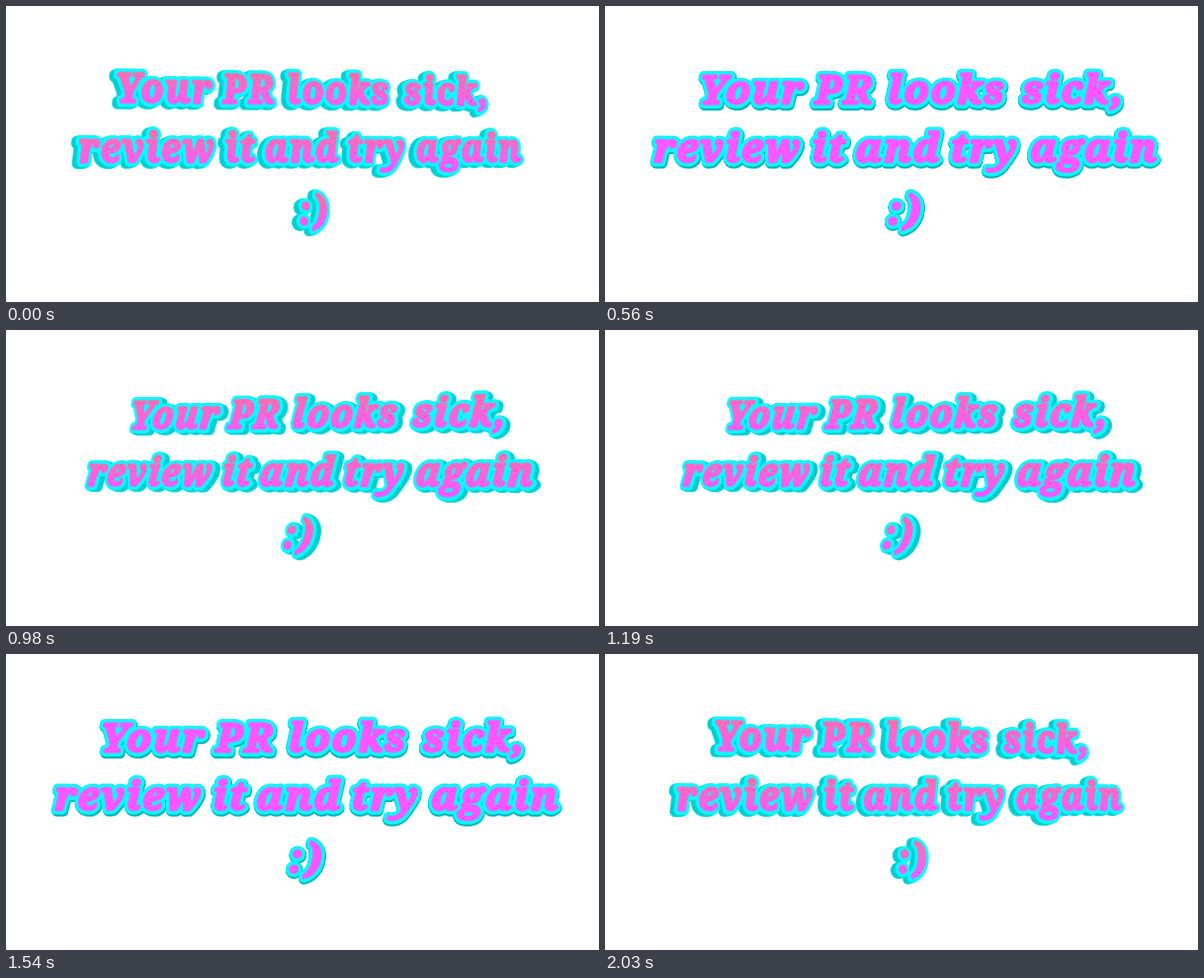
An HTML page without scripts that plays this animation: 600x300 px, repeating every 2.1 s.

```html
<!DOCTYPE html>
<html lang="en">
<head>
<meta charset="utf-8">
<title>Review message</title>
<style>
  @property --t { syntax: "<number>"; inherits: true; initial-value: 0; }
  @keyframes tick { from { --t: 0; } to { --t: 30; } }

  html, body { margin: 0; width: 100%; height: 100%; overflow: hidden; background: #fff; }
  /* --turn swings 1 to -1 and back; --glow peaks at both ends */
  body {
    position: relative;
    animation: tick 2100ms steps(30) infinite;
    --turn: cos(var(--t) * 12deg);
    --glow: calc(100% * var(--turn) * var(--turn));
  }
  .stage {
    position: absolute; left: 0; top: 0; width: 600px; height: 300px;
    overflow: hidden; perspective: 3450px;
  }
  .swing {
    position: absolute; inset: 0; transform-style: preserve-3d;
    transform: rotateY(calc(.5rad * var(--turn))) rotateX(10deg);
  }
  .swing svg {
    position: absolute; left: 0; top: 0; width: 600px; height: 300px;
    transform: translateZ(var(--z));
    stroke-linejoin: round; stroke-width: 9.6px;
  }
  text {
    font: italic 900 40px "Noto Serif", "DejaVu Serif", serif;
    letter-spacing: 2.3px; text-anchor: middle;
  }
  /* extruded sides, bright rim, face */
  .side { --c: color-mix(in srgb, #00d0d4 var(--glow), #00b0b4); fill: var(--c); stroke: var(--c); }
  .rim { fill: #0ff; stroke: #0ff; }
  .swing .face { fill: url(#pink); stroke: url(#pink); stroke-width: 3px; }
  .top { stop-color: color-mix(in srgb, #ff6cb0 var(--glow), #ff55ff); }
  .low { stop-color: color-mix(in srgb, #f756ff var(--glow), #ff55ff); }
  .defs { position: absolute; left: 0; top: 0; }
</style>
</head>
<body>
<svg class="defs" width="0" height="0">
  <defs>
    <linearGradient id="pink" x1="0" y1=".25" x2="0" y2=".9">
      <stop class="top" offset="0"/>
      <stop class="low" offset="1"/>
    </linearGradient>
    <g id="msg">
      <text x="-152" y="-51.5">Your</text>
      <text x="-58" y="-51.5">PR</text>
      <text x="46" y="-51.5">looks</text>
      <text x="174" y="-51.5">sick,</text>
      <text x="-176" y="9">review</text>
      <text x="-72.5" y="9">it</text>
      <text x="-2.5" y="9">and</text>
      <text x="84.5" y="9">try</text>
      <text x="195" y="9">again</text>
      <text x="4.5" y="73">:)</text>
    </g>
  </defs>
</svg>
<div class="stage">
  <div class="swing">
    <svg class="side" style="--z:-5.5px" viewBox="-300 -150 600 300"><use href="#msg"/></svg>
    <svg class="side" style="--z:-4px" viewBox="-300 -150 600 300"><use href="#msg"/></svg>
    <svg class="side" style="--z:-2.5px" viewBox="-300 -150 600 300"><use href="#msg"/></svg>
    <svg class="side" style="--z:-1px" viewBox="-300 -150 600 300"><use href="#msg"/></svg>
    <svg class="side" style="--z:.5px" viewBox="-300 -150 600 300"><use href="#msg"/></svg>
    <svg class="side" style="--z:2px" viewBox="-300 -150 600 300"><use href="#msg"/></svg>
    <svg class="side" style="--z:3.5px" viewBox="-300 -150 600 300"><use href="#msg"/></svg>
    <svg class="rim" style="--z:4.8px" viewBox="-300 -150 600 300"><use href="#msg"/></svg>
    <svg class="face" style="--z:5.5px" viewBox="-300 -150 600 300"><use href="#msg"/></svg>
  </div>
</div>
</body>
</html>
```
